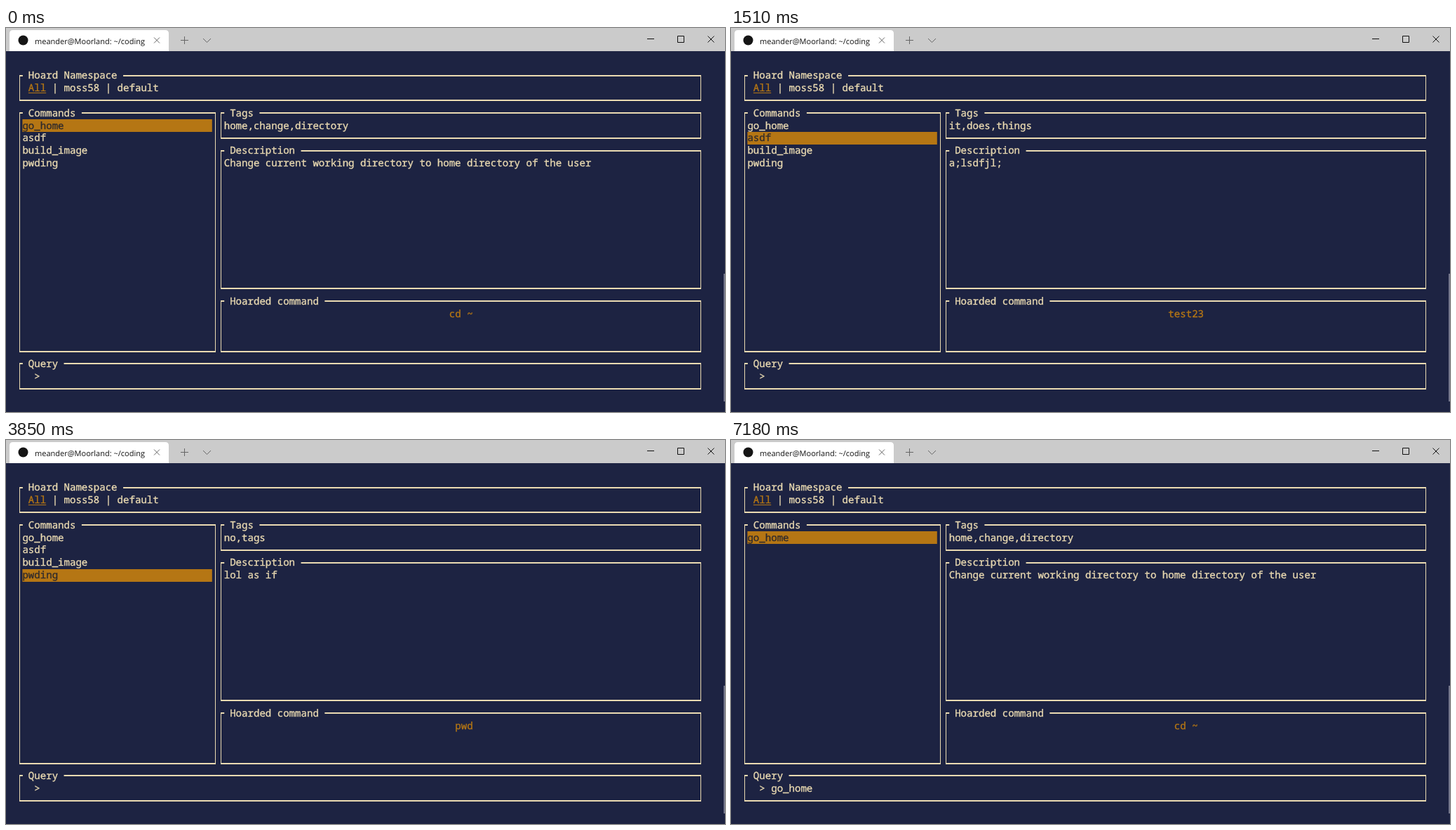
Write an HTML page that moves like this. It is 1025 px wide and 547 px high and loops after 8000 ms.

```html
<!DOCTYPE html>
<html lang="en">
<head>
<meta charset="utf-8">
<title>Command browser</title>
<style>
  html, body { margin: 0; width: 100%; height: 100%; overflow: hidden; background: #1d2342; }
  svg { display: block; width: 1025px; height: 547px; }
  text { text-rendering: geometricPrecision; }
  .cell { font: 14.08px "Noto Sans Mono", "DejaVu Sans Mono", monospace; fill: #ebdbb2; stroke: #ebdbb2; stroke-width: .35px; }
  .accent { fill: #b57614; stroke: #b57614; }
  .dark { fill: #302b2c; stroke: #302b2c; }
  .line { fill: #ebdbb2; }
  .bar { fill: #b57614; }
  .tab { font: 11px "Open Sans", "Noto Sans", sans-serif; fill: #111; }
  .icon { fill: none; stroke: #111; stroke-width: 1px; }
  .soft { stroke: #666; }
</style>
</head>
<body>
<svg viewBox="0 0 1025 547">
  <rect width="1025" height="547" fill="#1d2342"/>
  <rect width="1025" height="33" fill="#cbcbcb"/>
  <path d="M5 33V8Q5 3 10 3H227Q232 3 232 8V33Z" fill="#fff"/>
  <circle cx="24.5" cy="17.5" r="7" fill="#151515"/>
  <svg x="41" y="0" width="157.5" height="33"><text class="tab" x="0" y="22.5">meander@Moorland: ~/coding</text></svg>
  <path class="icon soft" d="M211 13.5L219 21.5M219 13.5L211 21.5M249 17.5H260M254.5 12V23M281 15L286.5 20.5L292 15"/>
  <path class="icon" d="M914 15.5H924M957.5 11.5H966.5V20.5H957.5ZM1000.5 11.5L1009.5 20.5M1009.5 11.5L1000.5 20.5"/>
  <rect x="1023" y="350" width="2" height="182" fill="#73758a"/>
  <g id="frames"></g>
  <g id="content"></g>
</svg>
<script>
const CELL_W = 8.45, CELL_H = 17.86, LOOP = 8000;
const colX = col => 6.5 + col * CELL_W;
const rowY = row => 67.6 + row * CELL_H;   // middle of a row

const rect = (x, y, w, h, cls) =>
  `<rect x="${x}" y="${y}" width="${w}" height="${h}" class="${cls}"/>`;
const text = (col, row, str, cls = "") =>
  `<text class="cell ${cls}" x="${colX(col)}" y="${Math.round(rowY(row) + 4.6)}">${str.replace(/>/g, "&gt;")}</text>`;

function panel(title, left, top, right, bottom) {
  const x1 = Math.floor(colX(left + .5)), x2 = Math.floor(colX(right + .5));
  const y1 = Math.round(rowY(top)) - 1, y2 = Math.round(rowY(bottom)) - 1;
  const resume = colX(left + 3 + title.length);
  return rect(x1, y1, colX(left + 1) + .5 - x1, 2, "line")
    + rect(resume, y1, x2 + 1 - resume, 2, "line")
    + rect(x1, y2, x2 + 1 - x1, 2, "line")
    + rect(x1, y1, 1, y2 - y1, "line")
    + rect(x2, y1, 1, y2 - y1, "line")
    + text(left + 2, top, title);
}

const commands = {
  go_home: ["home,change,directory", "Change current working directory to home directory of the user", "cd ~"],
  asdf: ["it,does,things", "a;lsdfjl;", "test23"],
  build_image: ["docker,build", "Build a docker image", "docker build"],
  pwding: ["no,tags", "lol as if", "pwd"],
};
const namespaces = ["All", "moss58", "default"];
const all = Object.keys(commands), user = all.slice(1), home = all.slice(0, 1);

// [start, namespace, listed commands, selected row, details shown, query]
const steps = [
  [0, 0, all, 0, true, ""],
  [500, 0, all, 1, true, ""],
  [780, 0, all, 2, true, ""],
  [1080, 0, all, 3, true, ""],
  [1360, 0, all, 2, true, ""],
  [1510, 0, all, 1, true, ""],
  [1760, 0, all, 0, true, ""],
  [2630, 1, user, 2, false, ""],
  [2750, 1, user, 2, true, ""],
  [3020, 2, home, 0, false, ""],
  [3170, 2, home, 0, true, ""],
  [3450, 1, user, 2, true, ""],
  [3850, 0, all, 3, true, ""],
  [5250, 0, all, 3, true, "g"],
  [5370, 0, home, 0, false, "go"],
  [5520, 0, home, -1, false, "go"],
  [5950, 0, home, 0, true, "go"],
  [6670, 0, home, 0, true, "go_"],
  [6820, 0, home, 0, true, "go_h"],
  [6940, 0, home, 0, true, "go_ho"],
  [7060, 0, home, 0, true, "go_hom"],
  [7180, 0, home, 0, true, "go_home"],
];

function render([, space, list, selected, details, query]) {
  let out = "", col = 3;
  namespaces.forEach((name, i) => {
    if (i) {
      out += text(col + 1, 1, "|");
      col += 3;
    }
    out += text(col, 1, name, i === space ? "accent" : "");
    if (i === space) out += rect(colX(col), 92, name.length * CELL_W, 1, "bar");
    col += name.length;
  });
  list.forEach((name, i) => {
    const row = 4 + i, active = i === selected;
    if (active) out += rect(colX(2), Math.round(rowY(row) - CELL_H / 2), 32 * CELL_W, 18, "bar");
    out += text(2, row, name, active ? "dark" : "");
  });
  if (details) {
    const [tags, description, command] = commands[list[selected]];
    out += text(36, 4, tags) + text(36, 7, description)
      + text(36 + Math.ceil((80 - command.length) / 2), 19, command, "accent");
  }
  return out + text(4, 24, ">") + text(6, 24, query);
}

document.getElementById("frames").innerHTML =
  panel("Hoard Namespace", 1, 0, 116, 2)
  + panel("Commands", 1, 3, 34, 22)
  + panel("Tags", 35, 3, 116, 5)
  + panel("Description", 35, 6, 116, 17)
  + panel("Hoarded command", 35, 18, 116, 22)
  + panel("Query", 1, 23, 116, 25);

const content = document.getElementById("content");
const start = performance.now();
let shown;
function tick() {
  const time = (performance.now() - start) % LOOP;
  const step = steps.findLast(([at]) => at <= time) || steps[0];
  if (step !== shown) content.innerHTML = render(shown = step);
  requestAnimationFrame(tick);
}
tick();
</script>
</body>
</html>
```
